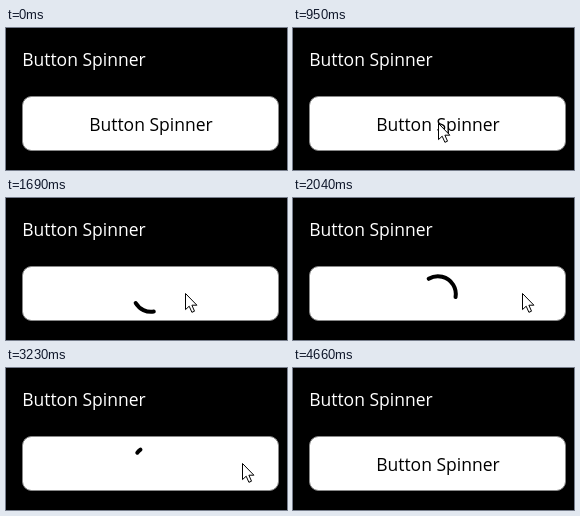
Recreate the animation shown at these times as an HTML page. Size 281 px wide and 142 px high, loop 5.19 s.

```html
<!DOCTYPE html>
<html lang="en">
<head>
<meta charset="utf-8">
<title>Button Spinner</title>
<style>
  html, body { margin: 0; width: 100%; height: 100%; overflow: hidden; background: #000; }
  svg { display: block; width: 281px; height: 142px; }
  text { font: 17.5px "Open Sans", "Noto Sans", sans-serif; }
</style>
</head>
<body>
<svg viewBox="0 0 281 142">
  <rect width="281" height="142" fill="#000"/>
  <text x="16.2" y="38" fill="#fff">Button Spinner</text>
  <rect x="16.5" y="68.5" width="256" height="54" rx="9" fill="#fff" stroke="#888"/>
  <text id="label" x="83.2" y="103" fill="#000">Button Spinner</text>
  <circle id="ring" cx="145" cy="96" r="17.8" pathLength="360" fill="none"
    stroke="#000" stroke-width="4" stroke-linecap="round"/>
  <path id="cursor" d="M.5 .5V16.6L4.2 13.2L6.9 19.3L9.5 18.2L6.9 12.2H11.9Z"
    fill="#fff" stroke="#000"/>
</svg>
<script>
  const LOOP = 5190, STEP = 70, PHASE = 10;
  const PRESS = 1150, HIDE = 1280, SPIN = 1310, SHOW = 3580, IDLE = 3650;
  const ENTER = 260, LEAVE = 4660;

  const easeIn = k => k * k;
  const easeOut = k => 1 - easeIn(1 - k);
  const easeInOut = k => k * k * (3 - 2 * k);

  const moves = [
    { start: ENTER, end: 680, from: [170, 134], to: [139, 96], ease: easeOut },
    { start: 830, end: 920, from: [139, 96], to: [145, 95], ease: easeOut },
    { start: 1340, end: 2180, from: [145, 95], to: [236, 95], ease: easeInOut },
    { start: 4310, end: LEAVE, from: [236, 95], to: [247, 142], ease: easeIn }
  ];

  const [label, ring, cursor] = ["label", "ring", "cursor"].map(id => document.getElementById(id));
  const within = (t, a, b) => t >= a && t < b;
  const clamp = k => Math.min(Math.max(k, 0), 1);
  const show = (el, on) => el.setAttribute("visibility", on ? "visible" : "hidden");
  const snap = t => Math.floor((t - PHASE) / STEP) * STEP + PHASE;

  function drawCursor(t) {
    const { start, end, from, to, ease } = moves.findLast(m => m.start <= t) || moves[0];
    const k = ease(clamp((t - start) / (end - start)));
    const [x, y] = from.map((v, i) => Math.round(v + (to[i] - v) * k));
    cursor.setAttribute("transform", `translate(${x} ${y})`);
  }

  // The arc grows to a half circle in one second, then shrinks in the next
  function drawRing(t) {
    const s = Math.max(t - SPIN, 0) / 1000 % 2;
    const head = clamp(s) * 180, tail = clamp(s - 1) * 180;
    ring.setAttribute("stroke-dasharray", `${Math.max(head - tail, .1)} 360`);
    ring.setAttribute("transform", `rotate(${s * 450 - 90 + tail} 145 96)`);
  }

  function render(t) {
    const step = snap(t);
    label.setAttribute("opacity", within(t, HIDE, SHOW) ? 0 : within(t, PRESS, IDLE) ? .5 : 1);
    show(ring, within(step, SPIN, SHOW));
    show(cursor, within(t, ENTER, LEAVE));
    drawRing(step);
    drawCursor(step);
  }

  const begin = performance.now();
  function frame() {
    render((performance.now() - begin) % LOOP);
    requestAnimationFrame(frame);
  }
  frame();
</script>
</body>
</html>
```
